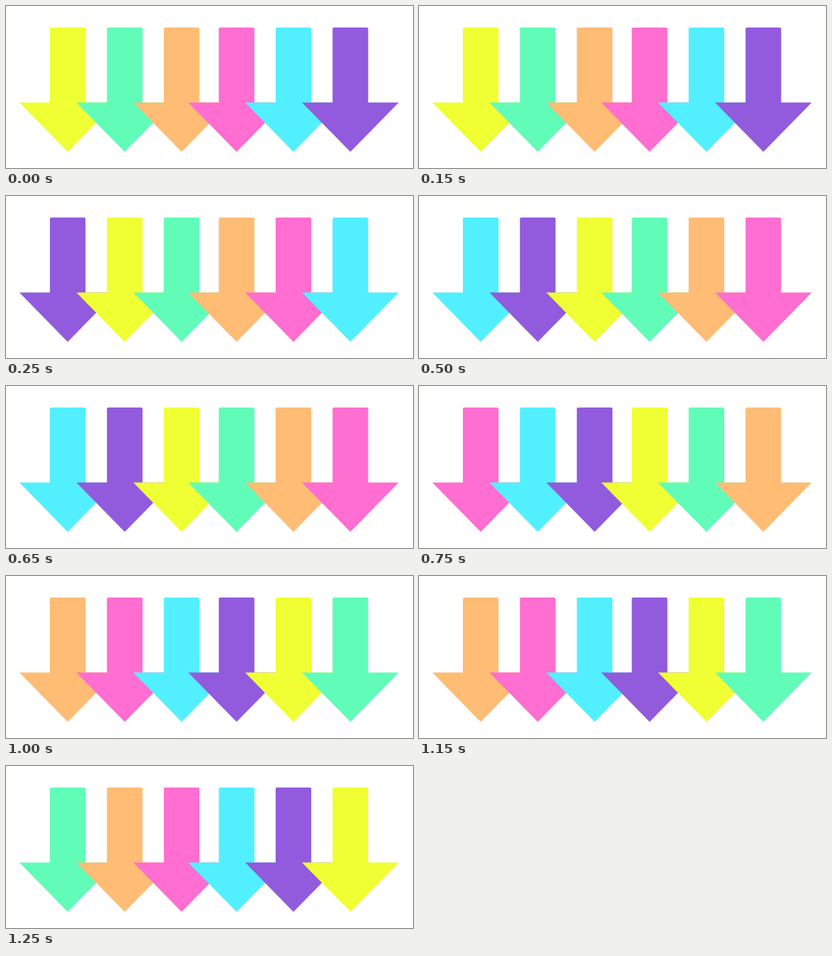
Write an HTML page that moves like this. It is 640 px wide and 256 px high and loops after 1.5 s.

```html
<!DOCTYPE html>
<html lang="en">
<head>
<meta charset="utf-8">
<title>Arrows</title>
<style>
  html, body { margin: 0; width: 100%; height: 100%; overflow: hidden; background: #fff; }
  svg { display: block; width: 640px; height: 256px; }
</style>
</head>
<body>
<svg id="stage" viewBox="0 0 640 256"></svg>
<script>
  const COLORS = ['#f0ff33', '#62fcb9', '#ffbc74', '#ff6ed0', '#52f0ff', '#925bdd'];
  const TIPS = [97, 186.7, 276.2, 362.6, 452, 541.5];
  const STEP = 250;
  // Arrow outline, relative to the x of its tip
  const ARROW = 'M-28 152.5V35.5L-26.5 34H26.5L28 35.5V152.5H76L0 230.5L-76 152.5Z';

  const stage = document.getElementById('stage');
  const arrows = TIPS.map(x => {
    const path = document.createElementNS('http://www.w3.org/2000/svg', 'path');
    path.setAttribute('d', ARROW);
    path.setAttribute('transform', `translate(${x} 0)`);
    return stage.appendChild(path);
  });

  // Each step hands every colour on to the next arrow to the right
  function draw(time) {
    const n = COLORS.length;
    const step = Math.floor(time / STEP) % n;
    arrows.forEach((arrow, i) => arrow.setAttribute('fill', COLORS[(i - step + n) % n]));
  }

  const start = performance.now();
  function tick() {
    draw(performance.now() - start);
    requestAnimationFrame(tick);
  }
  tick();
</script>
</body>
</html>
```
